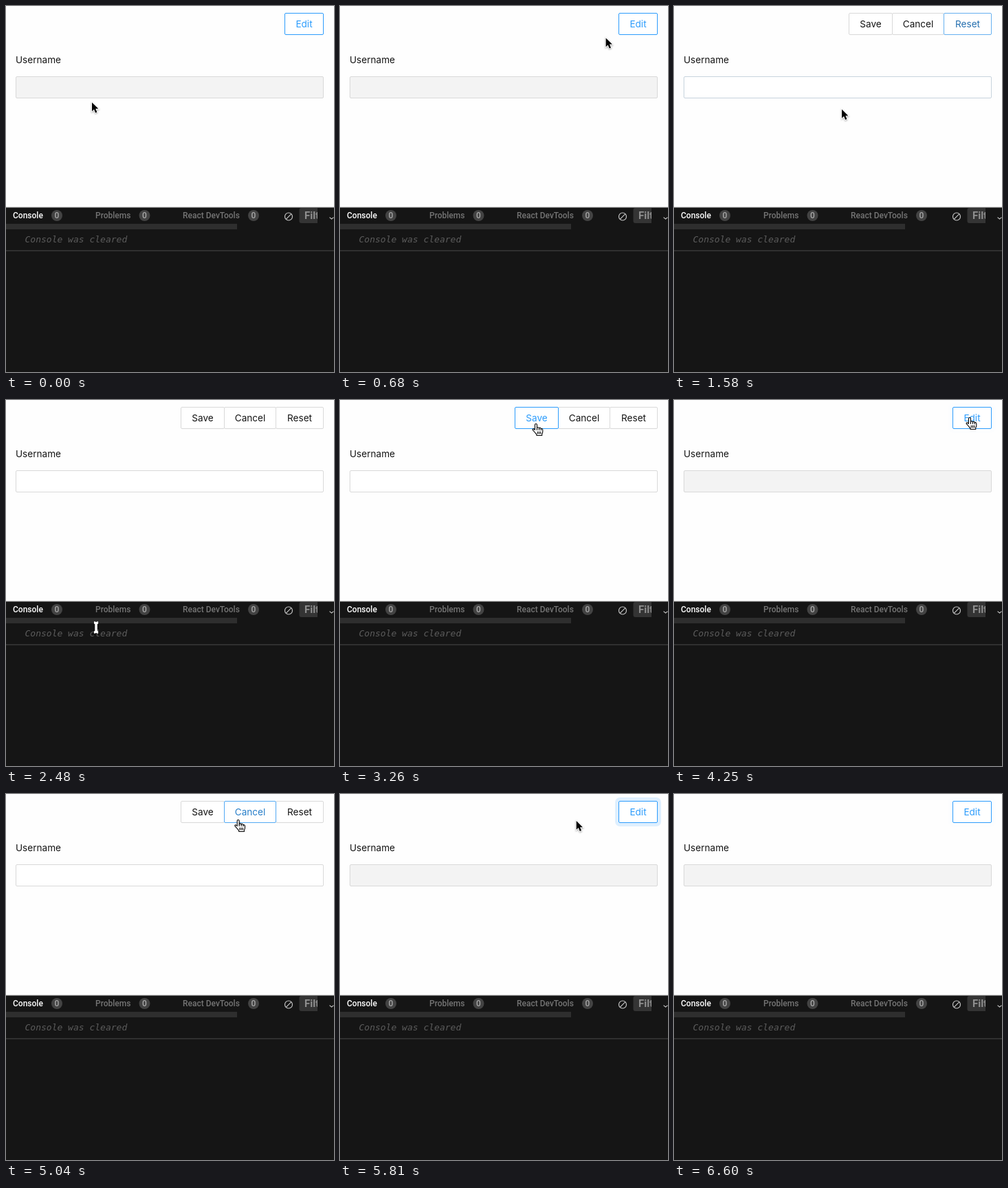
These frames come from a looping animation (477x531 px, 7220 ms). An HTML page:

```html
<!DOCTYPE html>
<html lang="en">
<head>
<meta charset="utf-8">
<title>Editable form</title>
<style>
  html, body { margin: 0; width: 100%; height: 100%; overflow: hidden; background: #fefefe; }
  svg { display: block; width: 477px; height: 531px; }
  .ui { font: 13.6px Inter, Roboto, sans-serif; fill: #141414; }
  .mid { text-anchor: middle; }
  .tab { font: 500 12px Roboto, sans-serif; fill: #757575; }
  .log { font: italic 13px "DejaVu Sans Mono", monospace; fill: #5c5c5c; }
  .filter { font: 600 15px Roboto, sans-serif; fill: #8f8f8f; }
  .box { fill: #fff; stroke: #d9d9d9; }
  #arrow { filter: drop-shadow(0 1px 1px rgba(0, 0, 0, .35)); }
</style>
</head>
<body>
<svg viewBox="0 0 477 531">
  <clipPath id="cut"><rect x="426" y="292" width="27" height="24"/></clipPath>
  <rect width="477" height="531" fill="#fefefe"/>
  <text class="ui" x="14" y="83">Username</text>
  <rect id="input" class="box" x="14.5" y="102.5" width="447" height="31" rx="1.5"/>
  <g id="buttons"></g>
  <rect id="wave" fill="none" stroke="#1890ff"/>

  <rect y="291" width="477" height="1" fill="#d9d9d9"/>
  <rect y="292" width="477" height="239" fill="#151515"/>
  <rect y="292" width="477" height="1" fill="#666"/>
  <g id="tabs"></g>
  <g fill="none" stroke="#c4c4c4" stroke-width="1.2">
    <circle cx="411" cy="305.5" r="5.5"/>
    <path d="M407.2 309.4l7.7-7.8"/>
    <path d="M470.5 306.6l3 2.4l3-2.4"/>
  </g>
  <g clip-path="url(#cut)">
    <rect x="426.5" y="293" width="40" height="22" rx="3" fill="#343434"/>
    <text class="filter" x="434" y="308.5">Filter</text>
  </g>
  <rect y="316" width="336" height="8" fill="#2e2e2e"/>
  <text class="log" x="27.5" y="343">Console was cleared</text>
  <rect y="354" width="477" height="2" fill="#303030"/>

  <g id="cursor">
    <path id="arrow" d="M0 0V12.7L3 9.9L5.1 14.9L7.4 13.9L5.3 9.1H9.3Z" stroke="#fff" stroke-width="1.8" paint-order="stroke"/>
    <g id="hand" transform="translate(-1 -1)" stroke="#000" stroke-width="1.1" stroke-linejoin="round" stroke-linecap="round">
      <path fill="#fff" d="M-1.5 1Q-1.5-.5 0-.5T1.5 1V6Q1.6 4.8 3 4.8T4.5 6.2Q4.7 5.2 6 5.4T7.3 7Q7.6 6.2 8.6 6.6T9.8 8.5V11Q9.8 13 8.7 14V16.5H1V15Q-.5 13.5-2 11.5L-4.8 8.3Q-5 6.8-3.6 6.8L-1.5 8.3Z"/>
      <path fill="none" d="M1.5 6V8.5M4.5 6.2V8.5M7.3 7V8.7M2.3 11V14M4.5 11V14M6.7 11V14"/>
    </g>
    <g id="beam" fill="none">
      <path id="bar" stroke="#fff" stroke-width="3" d="M-3-7Q0-7 0-5Q0-7 3-7M0-5V5M-3 7Q0 7 0 5Q0 7 3 7M-1.5 2.5H1.5"/>
      <use href="#bar" style="stroke:#000;stroke-width:1"/>
    </g>
  </g>
</svg>
<script>
const LOOP = 7220, FADE = 300;
const BLUE = [44, 156, 252], INK = [20, 20, 20], LINE = [217, 217, 217];
const RIGHT = 462;
const $ = id => document.getElementById(id);

function set(el, attrs) {
  for (const k in attrs) el.setAttribute(k, attrs[k]);
  return el;
}

function add(parent, tag, attrs, text = "") {
  const el = set(document.createElementNS("http://www.w3.org/2000/svg", tag), attrs);
  el.textContent = text;
  return parent.appendChild(el);
}

// When the form is editable, and when each control is hovered
const editing = [[1110, 3320], [4710, 5670]];
const inputHover = [[1480, 1575]];
const edit = { label: "Edit", w: 57, hover: [] };
const group = [
  { label: "Save", w: 64, hover: [[2900, 3320]] },
  { label: "Cancel", w: 76, hover: [[4855, 5670]] },
  { label: "Reset", w: 70, hover: [[1110, 1450], [4710, 4855]] }
];

// Lays buttons out from the right edge with shared borders
function layout(list) {
  let x = RIGHT + 1;
  for (const b of [...list].reverse()) {
    b.x = x -= b.w - (b === list.at(-1) ? -1 : 1);
    b.g = add($("buttons"), "g", {});
    b.box = add(b.g, "rect", { class: "box", x: x + .5, y: 10.5, width: b.w - 1, height: 31, rx: 1.5 });
    b.text = add(b.g, "text", { class: "ui mid", x: x + b.w / 2, y: 31 }, b.label);
  }
}
layout([edit]);
layout(group);

function addTab(label, x, badge, color) {
  add($("tabs"), "text", { class: "tab", x, y: 308, style: `fill:${color}` }, label);
  add($("tabs"), "circle", { cx: badge, cy: 304, r: 8, fill: "#434343" });
  add($("tabs"), "text", { class: "tab mid", x: badge, y: 308.3, style: "fill:#a8a8a8" }, "0");
}
addTab("Console", 10, 74, "#fff");
addTab("Problems", 130, 201.5, "#757575");
addTab("React DevTools", 257, 360, "#757575");

// Pointer moves: start, end, target, and the bend of the curve if any
const home = [125, 140];
const moves = [
  [110, 820, [418, 39], [260, 75]],
  [880, 940, [420, 34]],
  [1380, 1780, [235, 322], [162, 120]],
  [1840, 2130, [4, 352], [100, 420]],
  [2130, 2480, [131, 330], [150, 420]],
  [2480, 2560, [233, 116]],
  [2590, 3260, [286, 36], [262, -30]],
  [3440, 4020, [413, 38], [345, 95]],
  [4080, 4250, [431, 27]],
  [4710, 5230, [318, 31], [343, 51]],
  [5380, 5460, [340, 31]],
  [5690, 6370, [433, 221], [360, 75]],
  [6400, 6600, [482, 550], [436, 330]]
];

const clamp = v => Math.max(0, Math.min(1, v));
const ease = p => p < .5 ? 4 * p ** 3 : 1 - 4 * (1 - p) ** 3;
const smooth = p => p * p * (3 - 2 * p);
const mix = (a, b, p) => `rgb(${a.map((v, i) => Math.round(v + (b[i] - v) * p))})`;
const within = (spans, t) => spans.some(([a, b]) => t >= a && t < b);
const inside = (x, y, l, t, w, h) => x >= l && x < l + w && y >= t && y < t + h;
const show = (el, on) => { el.style.display = on ? "" : "none"; };

// Fades in during a span and back out after it
function level(spans, t) {
  let p = 0;
  for (const [a, b] of spans)
    if (t >= a) p = clamp(clamp((Math.min(t, b) - a) / FADE) - Math.max(0, t - b) / FADE);
  return ease(p);
}

function pointAt(t) {
  let from = home;
  for (const [start, end, to, bend] of moves) {
    if (t < start) break;
    if (t < end) {
      const u = smooth((t - start) / (end - start)), v = 1 - u;
      return from.map((a, i) => {
        const c = bend ? bend[i] : (a + to[i]) / 2;
        return a * v * v + 2 * c * u * v + to[i] * u * u;
      });
    }
    from = to;
  }
  return from;
}

function drawForm(t, open) {
  $("input").style.fill = open ? "#fff" : "#f3f3f3";
  $("input").style.stroke = mix(LINE, BLUE, level(inputHover, t));
  for (const b of [edit, ...group]) {
    b.shown = open === (b !== edit);
    show(b.g, b.shown);
    const p = b === edit ? 1 : level(b.hover, t);
    b.box.style.stroke = mix(LINE, BLUE, p);
    b.text.style.fill = mix(INK, BLUE, p);
  }
  // Hovered borders sit above their neighbours
  const top = group.find(b => b.shown && level(b.hover, t) > .01);
  if (top && $("buttons").lastChild !== top.g) $("buttons").appendChild(top.g);
}

// Ring that spreads around Edit after the form closes
function drawWave(t) {
  const closed = editing.map(s => s[1]).filter(e => e <= t).at(-1);
  const age = (t - closed) / 2000;
  const on = age < 1 && !within(editing, t);
  show($("wave"), on);
  if (!on) return;
  const s = 6 * (1 - (1 - clamp(age * 5)) ** 4);
  set($("wave"), {
    x: edit.x - s / 2, y: 10 - s / 2, width: edit.w + s, height: 32 + s, rx: 2 + s / 2,
    "stroke-width": s, opacity: .2 * (1 - age) ** 5
  });
}

function drawCursor(t, open) {
  const [x, y] = pointAt(t);
  const onButton = [edit, ...group].some(b => b.shown && inside(x, y, b.x, 10, b.w, 32));
  const onText = open && inside(x, y, 14, 102, 448, 32) || inside(x, y, 27, 324, 150, 30);
  const kind = onButton ? "hand" : onText ? "beam" : "arrow";
  for (const id of ["arrow", "hand", "beam"]) show($(id), id === kind);
  set($("cursor"), { transform: `translate(${x.toFixed(2)} ${y.toFixed(2)})` });
}

function draw(t) {
  const open = within(editing, t);
  drawForm(t, open);
  drawWave(t);
  drawCursor(t, open);
}

const start = performance.now();
function tick() {
  draw((performance.now() - start) % LOOP);
  requestAnimationFrame(tick);
}
tick();
</script>
</body>
</html>
```
